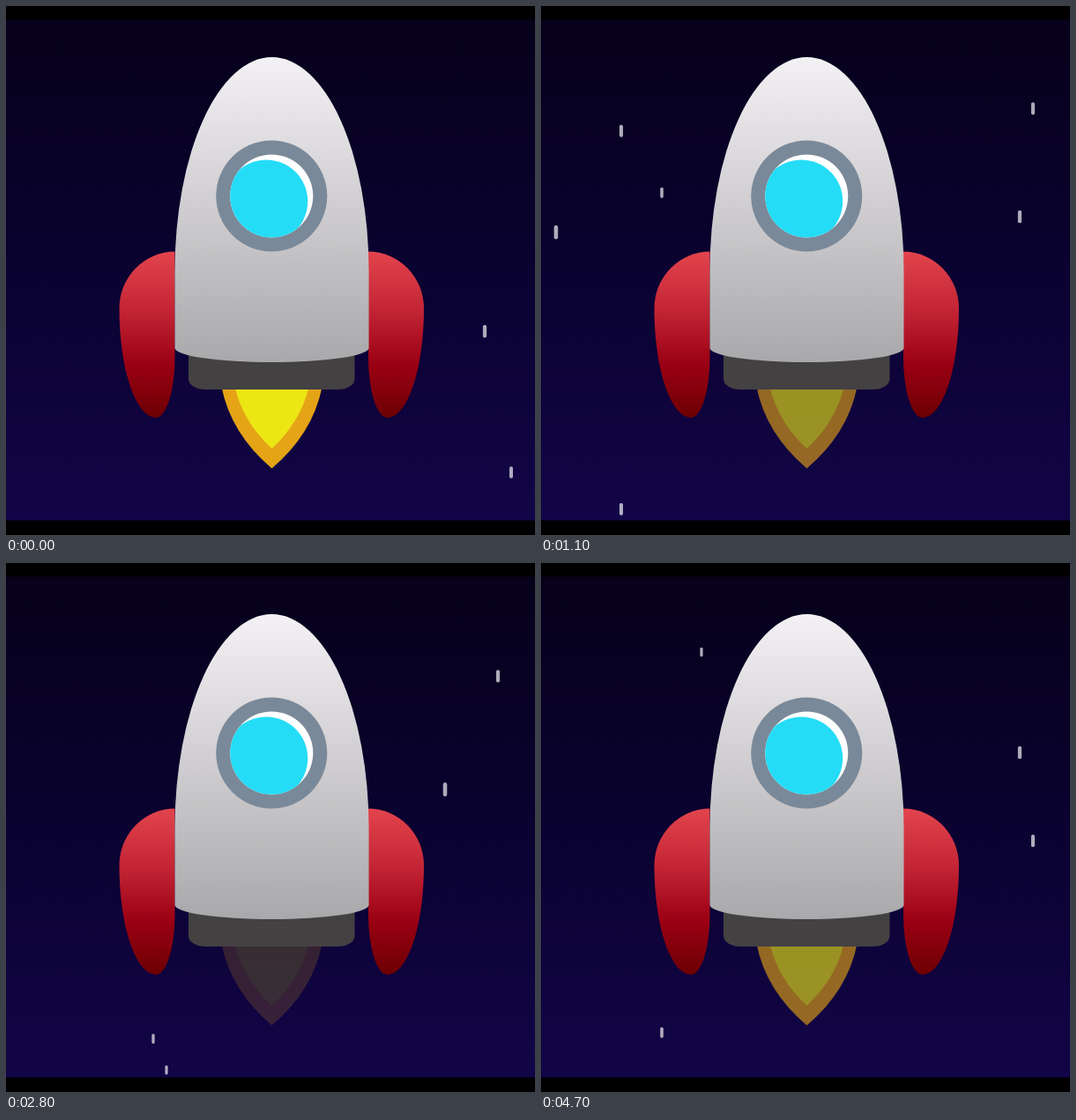
An HTML page that plays this animation: 600x600 px, repeating every 4800 ms.

```html
<!DOCTYPE html>
<html lang="en">
<head>
<meta charset="utf-8">
<title>Rocket</title>
<style>
  html, body { margin: 0; width: 100%; height: 100%; overflow: hidden; background: #000; }
  svg { display: block; width: 100vw; height: 100vh; }
  #scene { filter: blur(.55px); }
</style>
</head>
<body>
<svg viewBox="0 0 600 600">
  <defs>
    <linearGradient id="sky" x2="0" y2="1">
      <stop offset="0" stop-color="#07011b"/>
      <stop offset=".5" stop-color="#0a0230"/>
      <stop offset="1" stop-color="#120547"/>
    </linearGradient>
    <linearGradient id="hull" x2="0" y2="1">
      <stop offset="0" stop-color="#f4f1f4"/>
      <stop offset="1" stop-color="#a9a8aa"/>
    </linearGradient>
    <linearGradient id="red" x2="0" y2="1">
      <stop offset="0" stop-color="#e2444d"/>
      <stop offset=".35" stop-color="#c32535"/>
      <stop offset=".68" stop-color="#9a0013"/>
      <stop offset="1" stop-color="#6c0003"/>
    </linearGradient>
    <clipPath id="pane"><circle cx="301.25" cy="215.5" r="47"/></clipPath>
    <path id="fin" fill="url(#red)"
      d="M191.5 278.5A63 64.500 0 0 0 128.500 343A41.500 124 0 0 0 170 467A21.5 68 0 0 0 191.5 399Z"/>
  </defs>

  <rect y="15" width="600" height="569" fill="url(#sky)"/>

  <g id="scene">
    <g id="stars" fill="#d9d6e0" opacity=".8"></g>

    <g id="flame">
      <path fill="#e4a416" d="M244.500 432Q255 485 301.5 524.500Q348 485 358.500 432Z"/>
      <path fill="#ece615" d="M259.5 432Q269 472 301.5 502Q334 472 343.5 432Z"/>
    </g>

    <path fill="#444143" d="M207 390H395.500V423A19 12 0 0 1 376.500 435H226A19 12 0 0 1 207 423Z"/>
    <use href="#fin"/>
    <use href="#fin" transform="translate(602.5) scale(-1 1)"/>
    <path fill="url(#hull)"
      d="M191.500 300A110 242 0 0 1 411.500 300V388A110 16 0 0 1 191.500 388Z"/>

    <circle cx="301.25" cy="215.5" r="63" fill="#7a8999"/>
    <circle cx="301.25" cy="215.5" r="47" fill="#fff"/>
    <circle cx="295.25" cy="221.5" r="47" fill="#25dcf6" clip-path="url(#pane)"/>
  </g>

  <path d="M0 0H600V15.500H0ZM0 583.500H600V600H0Z"/>
</svg>
<script>
  const STEP = 100, STEPS = 48, TRAVEL = 1472;

  // Each star falls at its own steady speed: x, start y, fall per step
  const stars = [
    [17, 1051, 61.6], [62, 876, 126], [91, 1463, 52.7], [91, 1011, 54.8],
    [137, 1136, 49.8], [167, 916, 91.7], [182, 1351, 130], [288, 1454, 100],
    [498, 1296, 120.6], [543, 369, 122], [558, 628, 87.3], [573, 529, 69.8]
  ].map(([x, y, fall]) => ({ el: addStar(x), y, fall }));

  // Star size swells and shrinks across the sky
  function addStar(x) {
    const swell = Math.cos(x / 75);
    const w = 3.8 + .8 * swell, h = 13 + 3 * swell;
    const el = document.createElementNS("http://www.w3.org/2000/svg", "rect");
    const attrs = { x: x - w / 2, y: -h / 2, width: w, height: h, rx: w / 2 };
    for (const name in attrs) el.setAttribute(name, attrs[name]);
    document.getElementById("stars").append(el);
    return el;
  }

  const flame = document.getElementById("flame");

  function draw(now) {
    const n = Math.floor(now / STEP) % STEPS;
    for (const { el, y, fall } of stars) {
      el.setAttribute("transform", `translate(0 ${(y + fall * n) % TRAVEL})`);
    }
    flame.setAttribute("opacity", Math.abs(1 - .815 * (n % 3)));
  }

  const start = performance.now();
  function tick() {
    draw(performance.now() - start);
    requestAnimationFrame(tick);
  }
  tick();
</script>
</body>
</html>
```
